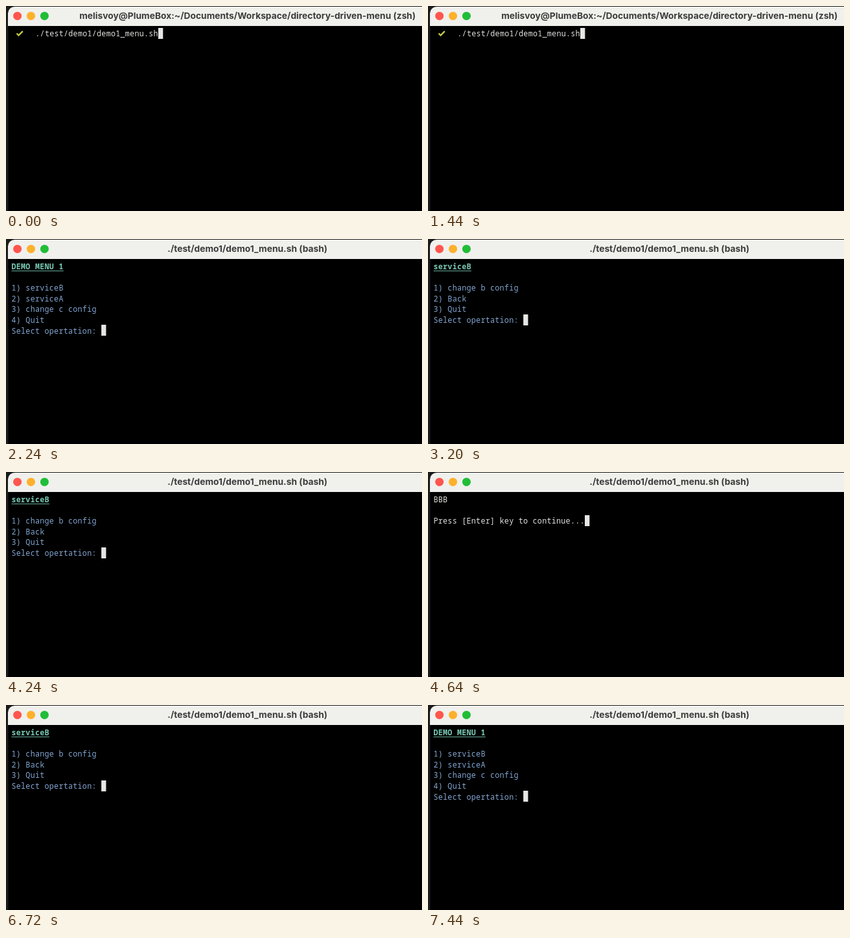
An HTML page that plays this animation: 642x318 px, repeating every 8 s.

```html
<!DOCTYPE html>
<html lang="en">
<head>
<meta charset="utf-8">
<title>Terminal menu</title>
<style>
  html, body { margin: 0; width: 100%; height: 100%; overflow: hidden; background: #000; }
  svg { display: block; }
  text { white-space: pre; }
  #title { font: 700 13.8px Inter, sans-serif; fill: #3c3c3b; text-anchor: middle; }
  #lines { font: 11.7px "Noto Sans Mono", monospace; letter-spacing: .277px; }
  .plain { fill: #e2e2e0; }
  .menu { fill: #83a6d2; }
  .head { fill: #78c8b3; font-weight: 700; }
</style>
</head>
<body>
<svg width="642" height="318" viewBox="0 0 642 318">
  <rect width="642" height="318" fill="#1b1b1b"/>
  <path d="M3.5 31H642V318H3.5Z" fill="#000"/>
  <path d="M3 31V11.5a10.5 10.5 0 0 1 10.5-10.5H642V31Z" fill="#f0f0ed"/>
  <circle cx="17.6" cy="15.4" r="6.5" fill="#fe554e"/>
  <circle cx="38.5" cy="15.4" r="6.5" fill="#fcb12c"/>
  <circle cx="59.4" cy="15.4" r="6.5" fill="#20be37"/>
  <text id="title" x="372.7" y="20"/>
  <path id="check" d="M16.5 42.5l3 3 6.3-6.3" fill="none" stroke="#c6c84a" stroke-width="2.4"/>
  <g id="lines"></g>
  <rect id="underline" x="8.5" y="49" height="1" fill="#69b09d"/>
  <rect id="cursor" width="7.3" height="17" fill="#e6e6e4"/>
</svg>
<script>
const LOOP = 8000, LEFT = 8.5, ADVANCE = 7.297, ROW = 16.6;
const $ = id => document.getElementById(id);
const shellTitle = 'melisvoy@PlumeBox:~/Documents/Workspace/directory-driven-menu (zsh)';
const scriptTitle = './test/demo1/demo1_menu.sh (bash)';

const menu = (head, items, typed = '') => ({
  title: scriptTitle, head, kind: 'menu',
  lines: [head, '', ...items.map((s, i) => `${i + 1}) ${s}`), 'Select opertation: ' + typed],
  typed
});
const mainMenu = typed => menu('DEMO MENU 1', ['serviceB', 'serviceA', 'change c config', 'Quit'], typed);
const subMenu = typed => menu('serviceB', ['change b config', 'Back', 'Quit'], typed);

const scenes = [
  [0, { title: shellTitle, kind: 'plain', left: 45.3, lines: ['./test/demo1/demo1_menu.sh'] }],
  [1520, mainMenu()],
  [2880, mainMenu('1')],
  [3200, subMenu()],
  [4320, subMenu('1')],
  [4640, { title: scriptTitle, kind: 'plain', lines: ['BBB', '', 'Press [Enter] key to continue...'] }],
  [5360, subMenu()],
  [6800, subMenu('2')],
  [7120, mainMenu()]
];

function addText(cls, x, row, string) {
  const el = document.createElementNS('http://www.w3.org/2000/svg', 'text');
  el.setAttribute('class', cls);
  el.setAttribute('x', x);
  el.setAttribute('y', Math.round(47 + row * ROW));
  el.textContent = string;
  $('lines').append(el);
}

function draw({ title, head, kind, lines, typed = '', left = LEFT }) {
  $('title').textContent = title;
  $('check').style.display = title === shellTitle ? '' : 'none';
  $('underline').setAttribute('width', head ? head.length * ADVANCE : 0);
  $('lines').replaceChildren();
  const last = lines.length - 1;
  const end = left + lines[last].length * ADVANCE;
  lines.forEach((line, row) => {
    const shown = row === last ? line.slice(0, line.length - typed.length) : line;
    addText(head && row === 0 ? 'head' : kind, left, row, shown);
  });
  if (typed) addText('plain', end - ADVANCE, last, typed);
  $('cursor').setAttribute('x', end);
  $('cursor').setAttribute('y', Math.round(33.7 + last * ROW));
}

let current;
function tick() {
  const time = performance.now() % LOOP;
  const scene = scenes.findLast(([start]) => start <= time)[1];
  if (scene !== current) draw(current = scene);
  requestAnimationFrame(tick);
}
tick();
</script>
</body>
</html>
```
